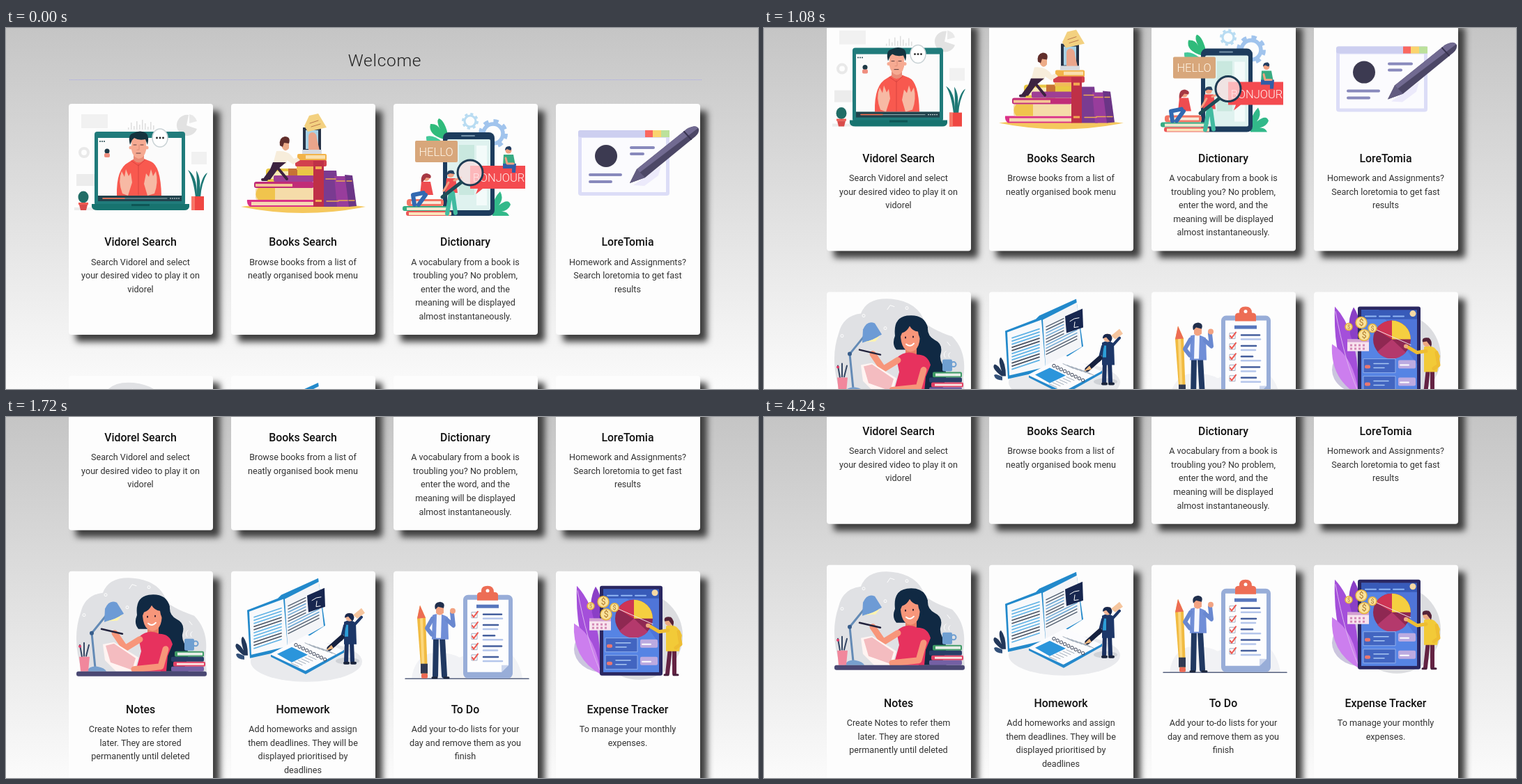
These frames come from a looping animation (1079x519 px, 4360 ms). An HTML page:

```html
<!DOCTYPE html>
<html lang="en">
<head>
<meta charset="utf-8">
<title>Welcome</title>
<style>
  html, body { margin: 0; width: 100%; height: 100%; overflow: hidden; }
  body { position: relative; background: linear-gradient(#c5c5c5, #fbfbfb); font-family: Roboto, sans-serif; }
  #page { position: absolute; inset: 0; }
  h1 { position: absolute; left: 90px; top: 33px; width: 907px; margin: 0; text-align: center;
       font-size: 24.5px; line-height: 28px; font-weight: 300; letter-spacing: .7px; color: #222; }
  #rule { position: absolute; left: 91px; top: 74px; width: 907px; border-top: 1px dotted #a5a5ea; }
  .card { position: absolute; width: 207px; height: 332px; background: #fdfdfd; border-radius: 4px;
          box-shadow: 10px 10px 10px #3e3e3e; }
  .card svg { display: block; width: 207px; height: 332px; overflow: visible; }
  .title { font-size: 15.85px; font-weight: 500; fill: #111; text-anchor: middle; }
  .line { font-size: 12.6px; fill: #333; text-anchor: middle; }
  #status { position: absolute; left: 0; top: 508px; width: 101px; height: 11px; overflow: hidden;
            background: #2d4f70; border-radius: 0 3px 0 0; color: #eef4fa;
            font: 9.8px/14px "Open Sans", sans-serif; white-space: nowrap; }
  #hand { position: absolute; left: 114px; top: 84px; width: 16px; height: 20px; }
</style>
</head>
<body>
<div id="page"><h1>Welcome</h1><div id="rule"></div></div>
<div id="status">27.0.0.1:8000/vidorel</div>
<svg id="hand" viewBox="0 0 16 20"><path d="M4.5 12V2.3q0-1.5 1.4-1.5t1.4 1.5V8q0-1 1.2-1t1.2 1.2q0-.9 1.2-.9t1.2 1.2q0-.7 1-.7 1.2 0 1.2 1.6v4q0 2-1.5 5.1H6.2Q5 16 1.2 12.5q-.7-1 .3-1.7 1.2-.5 3 2.2" fill="#fff" stroke="#222" stroke-width="1.1"/></svg>
<script>
// Drawing helpers; all illustration coordinates are stage coordinates.
const P = (d, fill, more = '') => `<path d="${d}" fill="${fill}" ${more}/>`;
const L = (d, stroke, w = 2) => P(d, 'none', `stroke="${stroke}" stroke-width="${w}" stroke-linecap="round" stroke-linejoin="round"`);
const R = (x, y, w, h, fill, r = 0) => `<rect x="${x}" y="${y}" width="${w}" height="${h}" rx="${r}" fill="${fill}"/>`;
const E = (x, y, rx, ry, fill, more = '') => `<ellipse cx="${x}" cy="${y}" rx="${rx}" ry="${ry}" fill="${fill}" ${more}/>`;
const C = (x, y, r, fill, more) => E(x, y, r, r, fill, more);
const T = (x, y, size, fill, text, more = '') => `<text x="${x}" y="${y}" font-size="${size}" fill="${fill}" text-anchor="middle" ${more}>${text}</text>`;
const rep = (n, draw) => Array.from({ length: n }, (_, i) => draw(i)).join('');
const ring = (x, y, r, stroke, w, dash = '') => C(x, y, r, 'none', `stroke="${stroke}" stroke-width="${w}" stroke-dasharray="${dash}"`);
const gear = (x, y, r, color) => ring(x, y, r, color, r * .4) + ring(x, y, r * 1.3, color, r * .4, `${r * .51} ${r * .51}`);

const video = () =>
  R(108, 124, 38, 20, '#f1f1f1') + R(101, 210, 30, 17, '#ececec') + R(266, 178, 22, 18, '#f1f1f1') +
  ring(112, 179, 6, '#e9e9e9', 4) + rep(10, i => R(175 + i * 4, 143 - (i * 7 % 12), 1.5, 3 + (i * 7 % 12), '#dedede')) +
  P('M259 140L262 125A15 15 0 1 0 274 145Z', '#e2e2e2') + P('M263 137V124A14 14 0 0 1 274 134Z', '#e9e9e9') + R(98, 258, 30, 4, '#ececec') +
  R(127, 149, 130, 106, '#207b7b', 4) + R(132, 158, 120, 83, '#fbfbfb') +
  rep(3, i => C(135 + i * 3, 163, 1, '#24484f')) + C(145, 177, 3.5, '#1d3946') + R(141, 180, 8, 6, '#ef8e7f', 2) +
  P('M159 241Q158 202 176 193L184 188H198L208 192Q222 198 223 241Z', '#f8594f') +
  P('M183 178H198V190Q190 197 183 190Z', '#e98b77') + P('M180 157H201V176Q198 188 190 188Q182 186 180 175Z', '#f6aa92') + C(179, 172, 2.5, '#f6aa92') + C(202, 172, 2.5, '#f6aa92') +
  P('M178 168Q174 153 183 151Q193 146 201 151Q206 156 203 168L200 160Q190 162 184 158L181 161Z', '#14343f') +
  L('M183 168h4M193 168h4M187 180h6', '#5c3a3a', 1) + L('M191 168v7h-3', '#e08f78', 1) + L('M190 196V240M180 191l10 7 9-8', '#d94440', 1) +
  P('M167 238Q160 220 166 206L170 214L172 203L176 213L179 208L181 222L175 241Z', '#f7b9a4') +
  P('M203 241L198 224L201 209L205 214L208 203L211 213L215 206Q219 222 213 238Z', '#f7b9a4') +
  R(132, 241, 120, 8, '#21434d') + L('M139 245H231', '#9bb3b5', 1) + L('M139 245H170', '#ff704f', 1.5) + rep(5, i => C(236 + i * 3, 245, .8, '#fff')) +
  P('M123 253H263V257Q262 262 256 262H131Q124 262 123 257Z', '#17736f') + R(180, 253, 26, 3, '#0e5655') +
  E(221, 158, 11, 13, '#fff', 'stroke="#c9d2d5" stroke-width="1.5"') + rep(3, i => C(216.5 + i * 4.5, 158, 1.4, '#222')) +
  E(111, 243, 7.5, 8.5, '#216d66') + R(104, 251, 14, 3, '#f05b52') + P('M105 254h12l-2 8h-8Z', '#d94c4b') +
  P('M272 244Q269 217 261 204Q274 212 274 240Q274 216 273 205Q281 217 277 239Q280 213 289 208Q280 224 279 244Z', '#1d7875') +
  R(266, 242, 18, 20, '#ef4742') + R(266, 242, 5, 20, '#f87667');

const books = () =>
  P('M337 257Q425 246 516 257Q425 275 337 257Z', '#f5c85e') +
  P('M346 247H442V257H350Q345 253 346 247Z', '#db3187') + R(352, 250, 90, 5, '#f6d7b2') + R(358, 230, 84, 17, '#f5dca9', 3) +
  P('M362 230H386V247H362Q355 239 362 230Z', '#f0c44d') + R(356, 221, 86, 9, '#c12c78', 3) + R(358, 224, 53, 4, '#f5c595') +
  R(373, 202, 69, 19, '#eac845', 4) + R(380, 206, 37, 11, '#fae9b6') + R(405, 202, 13, 19, '#c67235') + R(384, 212, 58, 9, '#9e3f95', 2) +
  R(418, 181, 42, 10, '#f2b349', 2) + R(430, 183, 28, 5, '#fae0ad') + R(415, 190, 45, 9, '#d2404d', 2) + R(417, 199, 25, 5, '#f2bb58') +
  R(441, 191, 15, 66, '#bf3047') + R(444, 199, 9, 4, '#f4aa51') + R(444, 247, 9, 3, '#f4aa51') +
  P('M456 205H474L479 257H456Z', '#7a3b91') + P('M471 213H487L493 257H475Z', '#983d9c') + P('M486 211L497 212L503 256L492 257Z', '#6b3586') +
  L('M459 217H473M460 249H477M474 220H486M477 248H490M489 220h7M492 248h8', '#ebaa51', 1.5) +
  R(426, 143, 26, 32, '#273347') + P('M430 147H448V174H430Z', '#a9d2e6') + P('M434 176V159Q433 151 439 150Q446 150 446 159L450 176Z', '#eaa58b') + R(425, 175, 28, 6, '#d7dae0') +
  P('M435 126L448 123L460 143L433 149L428 141Z', '#f3d180') + L('M436 137l12-4M438 142l13-4', '#bb784d', 1) +
  P('M388 177Q405 175 413 188L418 186L422 190L412 196L403 190L402 196H383Z', '#f7eddb') +
  P('M383 193H402L390 203L379 218H368L379 203Z', '#3c2340') + L('M389 200l14 17M368 218h6', '#3c2340', 4) +
  P('M396 163H406V173Q401 180 396 172Z', '#edac88') + P('M393 169Q391 158 400 156Q409 156 406 166L399 165L397 171Z', '#612e2b');

const dictionary = () =>
  gear(666, 134, 8, '#b9dcf2') + gear(699, 152, 14, '#a1c4ed') +
  P('M628 160Q605 153 609 138Q619 137 623 146Q617 134 621 130Q630 133 635 157Z', '#2fbb7b') +
  P('M621 167Q602 173 603 156Q613 153 625 163Z', '#46c99a') +
  P('M698 270Q696 248 709 235Q715 245 707 255Q721 244 724 254Q721 262 711 264Q719 263 722 270Z', '#32b98a') +
  R(627, 150, 74, 120, '#1d3c5d', 8) + R(633, 160, 62, 102, '#dff2ef', 2) + R(653, 154, 20, 2, '#7693a9', 1) +
  R(650, 168, 22, 72, '#c9e8df') + R(675, 169, 15, 86, '#f3fbfa') +
  R(587, 162, 61, 31, '#d8a77b', 2) + T(617, 183.5, 16.5, '#fff6e8', 'HELLO', 'font-weight="300"') +
  P('M666 198H745V231H684L674 239L677 231H666Z', '#f44b50') + T(707, 221, 16.5, '#fff3f0', 'BONJOUR', 'font-weight="300"') +
  C(721, 176, 4.5, '#f2a182') + P('M716 176Q716 169 723 170Q727 173 724 176L719 174Z', '#243d60') +
  P('M714 182H728L731 198H713Z', '#39ab83') + P('M713 195H732L731 208H726V202H713Z', '#315da6') + L('M717 187l2 8h9', '#f2a182', 3) +
  R(575, 246, 53, 10, '#f37564', 4) + R(581, 249, 43, 4, '#f8ead8') + R(569, 256, 69, 7, '#37ac84', 3) + R(575, 258, 63, 4, '#f4e9d0') +
  R(574, 263, 65, 7, '#ed5858', 3) + R(578, 265, 61, 4, '#fbe4bb') +
  C(603, 215, 5, '#f2a182') + P('M596 224Q594 209 604 209Q612 211 609 216L603 215Z', '#a63843') + P('M596 221H609L613 240H594Z', '#ee4c50') +
  L('M599 237L584 240L586 254M602 240L592 254', '#3269b1', 6) +
  C(638, 210, 5, '#f2a182') + P('M633 211Q632 203 642 205L644 210L637 209Z', '#24415f') + P('M632 216H645L648 237H630Z', '#ef4d50') +
  L('M638 237L633 267M641 237L645 266', '#41bba0', 6) + L('M635 222l-7 12M643 219l10-4', '#f2a182', 3) +
  C(666, 208, 18, '#ffe2e5', 'fill-opacity=".72" stroke="#1d3b53" stroke-width="3"') + L('M653 222L626 243', '#1d4c57', 5);

const encyclopedia = () =>
  R(821, 147, 131, 94, '#dcddf7', 4) + R(826, 158, 121, 78, '#fbfbfe') + R(821, 147, 131, 10, '#cdcff0', 3) +
  R(917, 147, 11, 10, '#fa675f') + R(928, 147, 12, 10, '#fad46e') + R(940, 147, 12, 10, '#bce19b') +
  C(861, 184, 16, '#3c3a51') + L('M897 172H929M897 181H914M838 211H882M838 221H868', '#8889bc', 4) +
  P('M900 226L940 198L936 212L916 227Z', '#eceafb') +
  P('M895 223L905 203L977 145Q990 138 994 145Q995 151 989 156L917 215Z', '#4c4766') +
  P('M905 203L977 145Q990 138 993 144L909 208Z', '#716a91') + P('M895 223L905 203L917 215Z', '#625c80') + L('M973 149l10 11', '#38334f', 2);

const notes = () =>
  P('M109 357Q94 310 107 273Q113 247 139 244Q148 220 183 223Q222 227 231 258Q246 269 270 277Q292 299 286 336L288 358Z', '#e0e1e4') +
  rep(6, i => ring(112 + i * 31, 276 - (i * 29 % 47), 2, '#fff', 1)) + L('M177 238l4-6 6 2M263 285l4 5', '#fff', 1) +
  P('M190 296Q183 288 188 276Q185 250 205 247Q230 244 235 264Q234 276 245 282Q258 288 253 304Q252 312 259 322Q265 336 256 348Q258 354 262 357H222Q218 315 208 296Z', '#102943') +
  P('M203 289H219V302Q211 310 203 302Z', '#e77e63') + P('M196 264Q211 254 223 264Q227 297 210 299Q194 297 196 264Z', '#f7967a') +
  P('M193 284Q190 262 205 253Q226 250 229 286Q222 280 221 270Q213 269 209 262Q205 270 198 272Z', '#102943') +
  L('M203 278v1M214 277v1', '#3a2030', 2) + L('M204 288q6 5 11-1', '#fff', 2) +
  P('M190 308Q204 295 220 303Q235 303 239 318L232 335L230 357H186L194 328Z', '#e7325e') +
  L('M192 311L171 324L156 302', '#f7967a', 9) + P('M139 318L155 315L190 337L184 357H158L142 341Z', '#fff4f2') +
  P('M143 320L155 317L186 338L181 355L150 344Z', '#f4bcc0') + L('M229 325L222 350L184 354', '#f7967a', 9) + L('M137 296L167 303', '#22233d', 2.5) +
  L('M128 352L123 302L149 270', '#648bb6', 3) + P('M142 267Q148 253 159 258L169 274Q158 282 141 286Z', '#6d9bd5') + P('M143 285Q157 283 167 275L160 284Z', '#fff4ad') +
  C(123, 302, 3, '#385d8b') + P('M116 357Q119 349 131 350Q142 352 144 357Z', '#78a0ce') +
  L('M109 336l-3-17M112 335v-19M115 335l4-16', '#344663', 2) + C(106, 321, 2, '#e33d69') + P('M105 336H120L118 357H107Z', '#f1879c') +
  R(256, 310, 14, 17, '#6f9fd1', 2) + ring(272, 317, 3.5, '#6f9fd1', 2) + L('M260 307q-4-5 1-9M266 307q-3-4 1-7', '#fff', 1) +
  R(242, 328, 42, 8, '#3e9a65', 2) + R(246, 330, 36, 4, '#e9eee8') + R(237, 336, 47, 7, '#293e68', 2) + R(240, 343, 46, 7, '#e14165', 2) + R(245, 345, 39, 3, '#fae5e1') + R(237, 350, 47, 7, '#7460a4', 2) +
  R(101, 357, 187, 7, '#4a4873', 3);

const homework = () =>
  E(431, 343, 80, 29, '#e9eaed') +
  P('M346 269L390 252L395 247L448 223L458 291L404 326L350 338Z', '#2289cb') + P('M349 271L398 253L404 321L352 333Z', '#f8f9fb') + P('M400 253L449 228L456 292L404 321Z', '#f4f5f8') +
  rep(11, i => L(`M356 ${279 + i * 4.5}L395 ${266 + i * 4.5}`, i % 5 > 2 ? '#4a5362' : '#5eb2e5', 1.7)) +
  rep(10, i => L(`M405 ${263 + i * 4.4}L${i > 5 ? 449 : 430} ${(i > 5 ? 241 : 251) + i * 4.4}`, i % 4 > 1 ? '#68a5d3' : '#536071', 1.4)) +
  P('M432 248L457 237L458 264L434 272Z', '#17264f') + L('M439 255q6-5 13-5M446 256l-1 8 6-1', '#fff', 1) +
  P('M380 336L430 361L485 330V326L429 356L380 333Z', '#2589cc') + P('M379 332L432 304L484 327L430 356Z', '#fcfcfe') +
  P('M389 332L410 322L433 333L410 344Z', '#2b95db') + rep(9, i => ring(416 + i * 5.2, 319 + i * 2.6, 2.2, '#374054', 1)) +
  rep(6, i => L(`M${429 + i * 6} ${316 + i * 2}l15 7M${409 + i * 5} ${345 - i * 2}l11 5`, '#8b98a9', .8)) +
  P('M341 334Q325 322 331 317Q336 318 341 327Q335 309 340 307Q347 315 347 334Z', '#223759') + P('M342 335Q331 329 330 333Q332 340 342 340Z', '#33517a') +
  E(490, 342, 17, 5, '#cfd2d7') + L('M489 313L488 342M496 313L497 342', '#1b315f', 6) + L('M486 345h5M496 345h5', '#19233a', 4) +
  P('M485 286Q493 281 502 287L503 318H485Z', '#1d3768') + P('M487 290h4v17h-5Z', '#2d9ed7') + C(493, 279, 6, '#f1b494') + P('M486 280Q486 271 497 274Q502 279 497 285L491 278Z', '#18284d') +
  L('M486 291L481 311M500 290L510 279', '#1d3768', 4) + L('M464 324L482 308', '#16213f', 7) + P('M459 327L467 319L470 324Z', '#efb77d') + P('M498 276L510 266L515 273L504 281Z', '#f5c59e');

const todo = () =>
  P('M582 367Q586 338 608 331Q635 328 651 337Q691 320 718 325Q737 341 741 367Z', '#f1f2f5') + L('M573 367.5H750', '#56617e', 1.5) +
  R(656, 247, 71, 120, '#98add8', 7) + P('M662 254H721V348L711 358H662Z', '#fdfdfe') + P('M721 348L711 358V348Z', '#cbd5ed') +
  P('M676 255V247Q676 243 682 243Q681 234 691 234Q700 234 700 243Q706 243 706 247V255Z', '#ed6d55') + C(691, 241, 2.5, '#fff') + R(675, 261, 32, 5, '#5776bd') +
  rep(5, i => { const y = 276 + i * 15.3;
    return P(`M668 ${y - 4}h8v8h-8Z`, '#fff', 'stroke="#a4acc0" stroke-width="1"') + L(`M669 ${y}l2 3 6-8`, '#ed5952', 2) +
      L(`M685 ${y - 1}h${26 - i % 3 * 5}`, '#455f9d', 2.5) + L(`M685 ${y + 5}h${i % 2 ? 20 : 27}`, '#b5c6eb', 2.5); }) +
  P('M590 281L594 262L602 280L605 361H596Z', '#f1bb42') + P('M594 280H598L601 361H597Z', '#fbd77e') + P('M594 262L590 281L602 280Z', '#ed6c53') + R(595, 346, 10, 14, '#313a52') + R(596, 360, 9, 7, '#eb6954', 2) +
  L('M617 309L616 363M626 309L629 363', '#203861', 8) + L('M612 366h6M629 366h6', '#1c263c', 3) + P('M612 276Q622 272 634 279L635 311H611Z', '#708ed7') + P('M618 275h7l-1 34h-7Z', '#f6f8ff') +
  L('M612 281L604 295L611 304M633 283L642 291L640 273', '#6988d0', 6) + C(641, 270, 4, '#f2a382') +
  P('M617 264H628V273Q622 279 617 273Z', '#f2a382') + P('M616 268Q613 258 623 257Q631 258 628 266L620 264Z', '#202f4d');

const coin = (x, y, r) => C(x, y, r, '#f9e29a', 'stroke="#e7b33e" stroke-width="1.5"') + T(x, y + r * .5, r * 1.5, '#ad7729', '$');
const expenses = () =>
  C(908, 306, 63, '#dcdde0') + E(858, 325, 43, 34, '#cbc5de') +
  P('M852 357Q816 323 819 234Q854 271 853 357Z', '#a44fda') + P('M853 361Q812 338 815 288Q848 308 853 361Z', '#cc7eee') + P('M853 300Q830 265 846 235Q860 254 853 300Z', '#8a3fc6') + L('M820 241Q834 315 852 355', '#dcb4ef', 1) +
  R(852, 234, 90, 129, '#2a2761', 3) + R(857, 239, 80, 119, '#4f75d9') + P('M857 239H882L937 317V358H857Z', '#5684e4') + R(857, 239, 80, 13, '#385bb9') + L('M863 248h15M883 248h15M903 248h15', '#91b7f4', 2) + C(931, 244, 4.5, '#f7d9a4') +
  C(901, 281, 27, '#8f2852') + P('M901 281V254A27 27 0 0 1 928 281Z', '#f5cf40') + P('M901 281L878 267A27 27 0 0 1 901 254Z', '#ce3454') + P('M901 281L880 299A27 27 0 0 0 921 300Z', '#b4396c') + L('M878 267L928 289', '#eee0e7', 1) +
  R(837, 281, 31, 17, '#f8e3ee') + R(837, 281, 31, 4, '#d3a0d0') + rep(8, i => R(841 + i % 4 * 6, 288 + (i >> 2) * 5, 3, 3, '#d48ab6')) +
  coin(839, 263, 5) + coin(857, 257, 8) + coin(873, 265, 6) + coin(861, 275, 8) +
  rep(2, i => P(`M860 ${309 + i * 25}H906V${329 + i * 25}H860Z`, '#4265c1', 'stroke="#8faeea" stroke-width="1"') + R(862, 318 + i * 25, 8, 5, '#ea7770', 2) + L(`M875 ${316 + i * 25}h21M875 ${322 + i * 25}h15`, '#a9c7f2', 1.5) + R(910, 311 + i * 25, 25, 12, '#bcaae0', 2) + L(`M913 ${318 + i * 25}h12`, '#fff', 2)) +
  L('M953 323L949 360M959 323L959 360', '#642343', 6) + L('M945 362h5M958 362h6', '#4a213d', 3) + P('M947 292Q962 286 970 305L966 328H947Z', '#f2ca38') +
  L('M950 298L937 300L922 291M965 300L968 318L961 323', '#eebd32', 5) + C(921, 291, 3, '#eeaa82') + C(951, 286, 5.5, '#eeaa82') + P('M945 285Q943 277 954 279Q960 284 957 292L951 284Z', '#552338');

const cards = [
  ['Vidorel Search', 'Search Vidorel and select|your desired video to play it on|vidorel', video],
  ['Books Search', 'Browse books from a list of|neatly organised book menu', books],
  ['Dictionary', 'A vocabulary from a book is|troubling you? No problem,|enter the word, and the|meaning will be displayed|almost instantaneously.', dictionary],
  ['LoreTomia', 'Homework and Assignments?|Search loretomia to get fast|results', encyclopedia],
  ['Notes', 'Create Notes to refer them|later. They are stored|permanently until deleted', notes],
  ['Homework', 'Add homeworks and assign|them deadlines. They will be|displayed prioritised by|deadlines', homework],
  ['To Do', 'Add your to-do lists for your|day and remove them as you|finish', todo],
  ['Expense Tracker', 'To manage your monthly|expenses.', expenses],
];
const page = document.getElementById('page');
page.innerHTML += cards.map(([title, body, art], i) => {
  const row = i >> 2, x = 90 + i % 4 * 233;
  const lines = body.split('|').map((s, n) => `<text class="line" x="103" y="${231.5 + n * 19.6}">${s}</text>`).join('');
  return `<div class="card" style="left:${x}px;top:${109 + row * 391.3}px"><svg>
    <g transform="translate(${-x} ${row ? -213 : -109})">${art()}</g>
    <text class="title" x="103" y="204">${title}</text>${lines}</svg></div>`;
}).join('');

// Scroll keys: time in ms, offset in px, speed in px/ms.
const scrollKeys = [[460, 0, 0], [880, 80, .21], [1320, 173.3, .25], [1720, 278.3, .12], [1880, 287.3, 0]];
function scrollAt(t) {
  if (t <= scrollKeys[0][0]) return 0;
  const next = scrollKeys.findIndex(k => k[0] >= t);
  if (next < 0) return scrollKeys.at(-1)[1];
  const [t0, y0, v0] = scrollKeys[next - 1], [t1, y1, v1] = scrollKeys[next];
  const d = t1 - t0, u = (t - t0) / d, w = 1 - u;
  return w * w * ((1 + 2 * u) * y0 + u * d * v0) + u * u * ((1 + 2 * w) * y1 - w * d * v1);
}

const hand = document.getElementById('hand'), statusBar = document.getElementById('status');
const show = (el, on) => { el.style.visibility = on ? 'visible' : 'hidden'; };
function draw(now) {
  const t = Math.floor(now % 4360 / 40) * 40;
  page.style.transform = `translateY(${-scrollAt(t)}px)`;
  show(hand, t >= 3040 && t < 3640);
  show(statusBar, t >= 3080 && t < 3720);
  requestAnimationFrame(draw);
}
draw(0);
</script>
</body>
</html>
```
